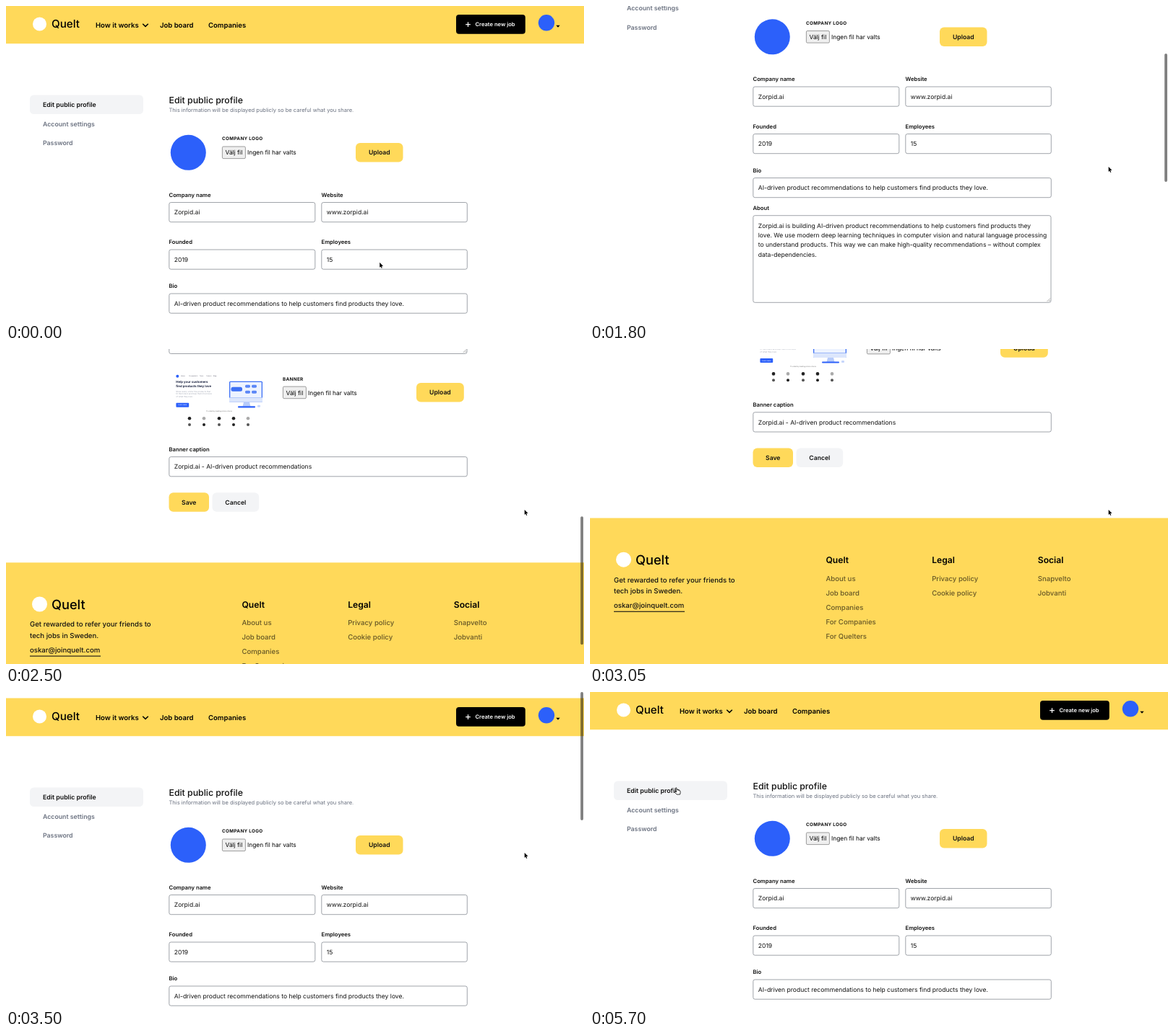
These frames come from a looping animation (800x437 px, 6230 ms). An HTML page:

```html
<!DOCTYPE html>
<html lang="en">
<head>
<meta charset="utf-8">
<title>Edit public profile</title>
<style>
  html, body { margin: 0; width: 100%; height: 100%; overflow: hidden; background: #fff; }
  svg { display: block; width: 100vw; height: 100vh; font-family: Inter, "Open Sans", sans-serif; text-rendering: geometricPrecision; }
</style>
</head>
<body>
<svg id="stage" viewBox="0 0 800 437">
  <g id="page"></g>
  <rect id="bar" x="795.2" width="3.8" height="178" rx="1.9" fill="#000" fill-opacity=".5"/>
  <g id="cursor" stroke="#fff" stroke-linejoin="round">
    <path id="arrow" d="M0 0V7L1.5 5.6 2.5 8 3.6 7.5 2.6 5.1H4.8Z" fill="#000" stroke-width=".5" paint-order="stroke"/>
    <path id="hand" d="M-2 -4.4Q-1.2 -5.4 -.6 -4.3L.4 -1.4Q1.1 -2 1.7 -1.2 2.5 -1.7 3 -.9 4 -1.2 4.3 0L4.6 2.2 4 4.6H-.4L-3.2 1.8Q-3.6 .8 -2.6 .7L-1 1.5Z" fill="#fff" stroke="#000" stroke-width=".8"/>
  </g>
</svg>
<script>
const $ = id => document.getElementById(id);
const YELLOW = '#ffd95a', BLUE = '#2c60fa', PALE = '#f3f4f6', GREY = '#6b7280', LINK = '#665726';
const parts = [];

// y is the middle of the capital letters
const text = (x, y, size, str, weight = 400, fill = '#111', extra = '') =>
  parts.push(`<text x="${x}" y="${y + size * .36}" font-size="${size}" font-weight="${weight}" fill="${fill}" ${extra}>${str}</text>`);
const rect = (x, y, w, h, fill, r = 0, extra = '') =>
  parts.push(`<rect x="${x}" y="${y}" width="${w}" height="${h}" rx="${r}" fill="${fill}" ${extra}/>`);
const dot = (x, y, r, fill) => parts.push(`<circle cx="${x}" cy="${y}" r="${r}" fill="${fill}"/>`);
const path = (d, stroke, width, fill = 'none') =>
  parts.push(`<path d="${d}" fill="${fill}" stroke="${stroke}" stroke-width="${width}"/>`);

const MID = 'text-anchor="middle"';
const label = (x, y, str) => text(x, y, 7.68, str, 600);
const caps = (x, y, str) => text(x, y, 6.35, str, 700, '#111', 'letter-spacing=".32"');
const frame = (x, y, w, h) => rect(x, y, w, h, '#fff', 2.5, 'stroke="#6f747e" stroke-width=".66"');
const button = (x, y, w, str, fill = YELLOW) => {
  rect(x, y, w, 26.6, fill, 6);
  text(x + w / 2, y + 13.3, 8.65, str, 600, '#111', MID);
};
const field = (x, y, w, name, value) => {
  label(x, y, name);
  frame(x + .3, y + 10.3, w, 27.2);
  text(x + 7.3, y + 24, 8.54, value);
};
const filePicker = (x, y) => {
  rect(x + .4, y - 8.4, 32, 16.6, '#efefef', 1.5, 'stroke="#767676" stroke-width=".7"');
  text(x + 16.3, y, 8.4, 'Välj fil', 400, '#000', MID);
  text(x + 35, y, 8.4, 'Ingen fil har valts', 400, '#000');
};

function header() {
  rect(0, -.5, 800, 52.7, YELLOW);
  dot(46.5, 25, 9.5, '#fff');
  text(63, 25, 15.2, 'Quelt', 500, '#000');
  text(124, 26.5, 9.54, 'How it works', 600, '#000');
  path('M189.2 24.8L193 28.4 196.8 24.8', '#000', 1.5);
  text(213, 26.5, 9.54, 'Job board', 600, '#000');
  text(280, 26.5, 9.54, 'Companies', 600, '#000');
  rect(623, 12, 95.8, 26.8, '#000', 4);
  path('M636.2 25.6H642.8M639.5 22.3V28.9', '#fff', 1.2);
  text(649.5, 25.6, 7.6, 'Create new job', 600, '#fff');
  dot(748, 23.3, 11.2, BLUE);
  path('M761.3 26.8H766.7L764 29.7Z', 'none', 0, '#000');
}

function form() {
  rect(33, 123.4, 157, 26.6, PALE, 5.5);
  text(51, 136.8, 8.76, 'Edit public profile', 600);
  text(51, 163.5, 8.76, 'Account settings', 600, GREY);
  text(51, 190, 8.76, 'Password', 600, GREY);

  text(225.5, 130.5, 12.3, 'Edit public profile', 500);
  text(225.5, 144.6, 7.54, 'This information will be displayed publicly so be careful what you share.', 400, GREY);
  dot(252.3, 203.3, 24.5, BLUE);
  caps(299, 184.2, 'COMPANY LOGO');
  filePicker(299, 203.4);
  button(484, 190, 65.5, 'Upload');

  field(225.5, 262.2, 202, 'Company name', 'Zorpid.ai');
  field(436.5, 262.2, 201.5, 'Website', 'www.zorpid.ai');
  field(225.5, 327.7, 202, 'Founded', '2019');
  field(436.5, 327.7, 201.5, 'Employees', '15');
  field(225.5, 388.7, 412.5, 'Bio', 'AI-driven product recommendations to help customers find products they love.');

  label(225.5, 441, 'About');
  frame(225.8, 451.2, 412.2, 120.6);
  path('M632.5 570.5L637 566M635 570.5L637 568.5', '#777', .6);
  ['Zorpid.ai is building AI-driven product recommendations to help customers find products they',
   'love. We use modern deep learning techniques in computer vision and natural language processing',
   'to understand products. This way we can make high-quality recommendations – without complex',
   'data-dependencies.'].forEach((line, i) => text(232.8, 465 + i * 13.4, 8.52, line));

  banner();
  caps(383, 606.6, 'BANNER');
  filePicker(383, 625.8);
  button(568, 612.3, 65.8, 'Upload');
  field(225.5, 704.6, 412.5, 'Banner caption', 'Zorpid.ai - AI-driven product recommendations');
  button(225.5, 764.5, 55.5, 'Save');
  button(285.5, 764.5, 64.7, 'Cancel', PALE);
}

function banner() {
  dot(237.3, 603, 2, BLUE);
  ['Home', 'Our products', 'Team', 'Careers', 'Blog'].forEach((s, i) =>
    text([242, 253, 268, 277, 287][i], 603, 2, s, 400, '#556'));
  text(235.3, 611, 4.35, 'Help your customers', 700, '#1b2340');
  text(235.3, 616.3, 4.35, 'find products they love', 700, '#1b2340');
  ['Show every visitor the products that', 'fit them best and help them find more', 'of what they love.'].forEach((s, i) =>
    text(235.3, 624 + i * 3.6, 2.8, s, 400, '#a3a8b5'));
  rect(235.4, 640, 17.8, 6, BLUE, 1);
  text(244.3, 643, 2.2, 'Learn more', 500, '#fff', MID);

  rect(309, 610, 46, 29, '#3d70f5', 1.5);
  rect(310.3, 611.3, 43.4, 21, '#edf3ff');
  rect(309, 632.5, 46, 6.5, '#dce6fc', 1);
  path('M329 639H337L338.5 645H327.5Z', 'none', 0, '#b7cbfa');
  rect(321, 644.5, 24, 2.2, BLUE, 1);
  rect(348, 643, 4, 3, '#c7d6fb', 1);
  rect(311.5, 618, 15.5, 6, '#3d70f5', 2.5);
  [[331, 615], [340, 615], [331, 623], [340, 623]].forEach(([x, y]) => rect(x, y, 7, 4, '#5b87f7', 1.6));

  text(295, 651, 2.4, 'Trusted by leading online stores', 400, '#777', MID);
  [254, 274, 295, 315, 335].forEach((x, i) => {
    dot(x, 661.5, 2.3, i == 1 || i == 4 ? '#aaa' : '#222');
    dot(x, 670.3, 2, i % 2 ? '#222' : '#555');
  });
}

function footer() {
  rect(0, 861.6, 800, 240, YELLOW);
  dot(46.5, 919.3, 10.5, '#fff');
  text(63, 920, 18.2, 'Quelt', 500, '#000');
  text(33, 947.3, 9.6, 'Get rewarded to refer your friends to', 500);
  text(33, 963, 9.6, 'tech jobs in Sweden.', 500);
  text(33, 982.9, 9.6, 'oskar@joinquelt.com', 500);
  rect(33, 990.8, 98, 1.1, '#111');
  const column = (x, title, links) => {
    text(x, 920, 12.1, title, 600, '#000');
    links.forEach((s, i) => text(x, 945.2 + i * 20, 9.6, s, 500, LINK));
  };
  column(326.5, 'Quelt', ['About us', 'Job board', 'Companies', 'For Companies', 'For Quelters']);
  column(473.2, 'Legal', ['Privacy policy', 'Cookie policy']);
  column(619.8, 'Social', ['Snapvelto', 'Jobvanti']);
}

header();
form();
footer();
$('page').innerHTML = parts.join('');

// [ms, scroll px, px per ms]
const SCROLL = [
  [1150, 0, 0], [1400, 12.7, .15], [1800, 160.5, .55], [2500, 565.3, .5], [2640, 627.1, .3],
  [2641, 627.1, 0], [3050, 627.1, 0], [3250, 400, -2.6], [3430, 0, -.4], [3500, -9, 0], [3850, 0, 0]
];
// [ms, x, y]
const MOVES = [
  [0, 517.2, 355.8], [250, 712, 222.3], [600, 712, 222.3], [750, 717.7, 223], [3900, 717.7, 223],
  [4250, 423, 247], [4550, 423, 247], [4800, 107, 190], [5150, 107, 190], [5400, 120.5, 137.5]
];

function span(keys, t) {
  const i = keys.findIndex(k => k[0] > t);
  if (i < 0) return [keys.at(-1), keys.at(-1), 0];
  if (!i) return [keys[0], keys[0], 0];
  const a = keys[i - 1], b = keys[i];
  return [a, b, (t - a[0]) / (b[0] - a[0])];
}

function scrollAt(t) {
  const [a, b, u] = span(SCROLL, t), d = b[0] - a[0], v = 1 - u;
  return a[1] * (1 + 2 * u) * v * v + a[2] * d * u * v * v + b[1] * u * u * (3 - 2 * u) - b[2] * d * u * u * v;
}

function barAlpha(t) {
  const fade = end => Math.max(0, Math.min(1, (end - t) / 200));
  return t <= 1150 ? 0 : t <= 3050 ? fade(3000) : fade(4250);
}

function draw(now) {
  const t = Math.floor(now % 6230 / 50) * 50;
  const scroll = scrollAt(t);
  $('page').setAttribute('transform', `translate(0 ${-scroll})`);
  $('bar').setAttribute('y', Math.max(0, scroll) * 437 / 1064);
  $('bar').setAttribute('opacity', barAlpha(t));

  const [a, b, u] = span(MOVES, t), e = u * u * (3 - 2 * u);
  const x = a[1] + (b[1] - a[1]) * e, y = a[2] + (b[2] - a[2]) * e;
  const overMenu = x > 33 && x < 190 && y > 123 && y < 203;
  $('cursor').setAttribute('transform', `translate(${x} ${y})`);
  $('arrow').style.display = overMenu ? 'none' : '';
  $('hand').style.display = overMenu ? '' : 'none';
  requestAnimationFrame(draw);
}
requestAnimationFrame(draw);
</script>
</body>
</html>
```
